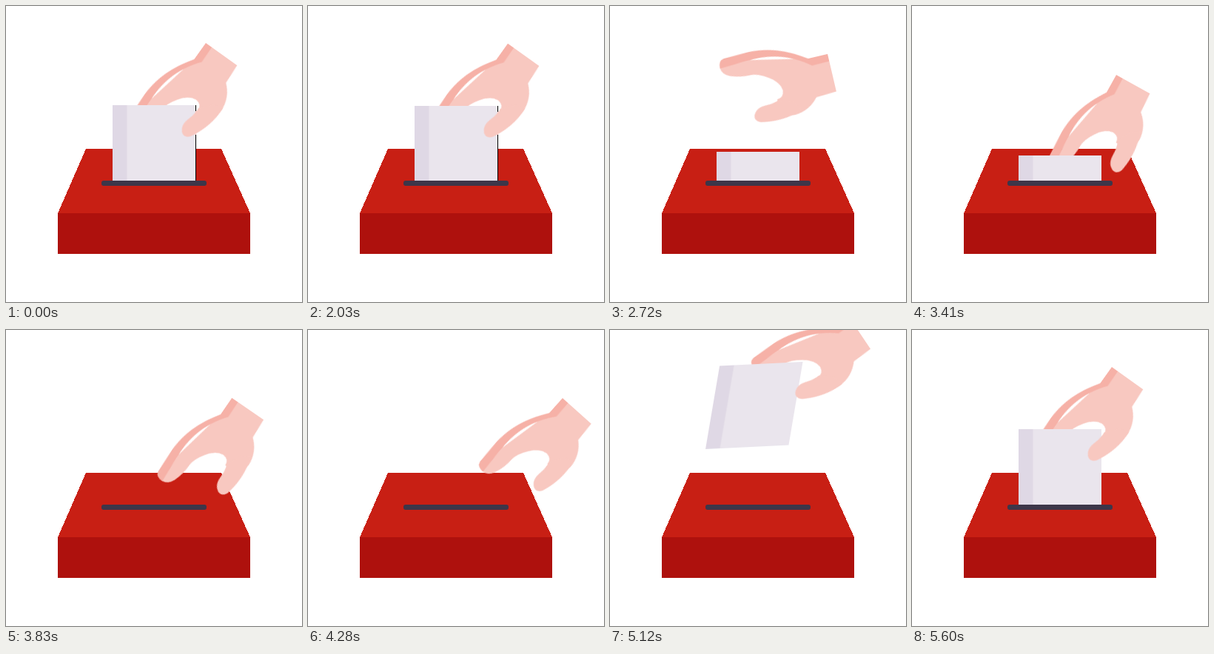
Animation, 400 px wide and 400 px high, one loop 5.63 s. Source, as an HTML page:

```html
<!DOCTYPE html>
<html lang="en">
<head>
<meta charset="utf-8">
<title>Casting a ballot</title>
<style>
  html, body { margin: 0; height: 100%; overflow: hidden; background: #fff; }
  svg { display: block; width: 100%; height: 100%; }
  .skin { fill: #f8c8c0; }
  .shade { fill: #f6b1a7; }
  .box { shape-rendering: crispEdges; }

  .hand, .thumb, .sheet { animation: 5630ms ease-in-out infinite; }
  .hand { animation-name: hand; }
  .thumb { animation-name: thumb; transform-origin: 57px 72px; }
  .sheet { animation-name: sheet; }

  /* push down, let go, push again, leave to the right, return from above */
  @keyframes hand {
    0%, 35.52% { transform: translate(270px, 50px) rotate(35.5deg); }
    42.63% { transform: translate(270px, 113px) rotate(35.5deg); }
    48.31% { transform: translate(294px, 65px) rotate(76.8deg); animation-timing-function: ease-out; }
    50.44% { transform: translate(294px, 58px) rotate(76.8deg); animation-timing-function: ease-in; }
    60.57% { transform: translate(276px, 93px) rotate(29deg); animation-timing-function: ease-out; }
    64.65% { transform: translate(278px, 113px) rotate(29deg); }
    70.69% { transform: translate(323px, 78px) rotate(38deg); }
    76.02% { transform: translate(344px, 92px) rotate(41.8deg); animation-timing-function: ease-in; }
    80.82% { transform: translate(534px, 172px) rotate(41.8deg); animation-timing-function: step-end; }
    83.48% { transform: translate(419px, -63px) rotate(95.5deg); animation-timing-function: linear; }
    88.81% { transform: translate(347px, -48px) rotate(65.5deg); animation-timing-function: ease-out; }
    99.47%, 100% { transform: translate(270px, 50px) rotate(35.5deg); }
  }
  @keyframes thumb {
    0%, 42.63%, 83.48%, 100% { transform: none; }
    48.31%, 64.65% { transform: translateY(-4px) rotate(-17deg); }
    76.02%, 80.82% { transform: translateY(-3px) rotate(-9deg); }
  }
  @keyframes sheet {
    0%, 35.52% { transform: translate(144px, 134px) skew(0deg, 0deg); }
    42.63%, 59.68% { transform: translate(144px, 197px) skew(0deg, 0deg); animation-timing-function: linear; }
    35.52% { animation-timing-function: ease-in-out; }
    60.57% { transform: translate(144px, 202px) skew(0deg, 0deg); animation-timing-function: linear; }
    65.72% { transform: translate(144px, 243px) skew(0deg, 0deg); animation-timing-function: step-end; }
    83.48% { transform: translate(178px, -100px) skew(0deg, -8deg); animation-timing-function: linear; }
    88.81% { transform: translate(150px, 10px) skew(-14deg, -4deg); animation-timing-function: ease-out; }
    99.47%, 100% { transform: translate(144px, 134px) skew(0deg, 0deg); }
  }
</style>
</head>
<body>
<svg viewBox="0 0 400 400">
  <clipPath id="aboveSlot"><rect width="400" height="240"/></clipPath>
  <g class="box">
    <path fill="#c81f14" d="M108 193H291L330 280H70Z"/>
    <rect x="70" y="280" width="260" height="55" rx="1" fill="#ae110d"/>
  </g>
  <g class="hand">
    <path class="skin" d="M0 0H52L53.5 28C63 36 70 48 70 62L66 84L44 80Q44 71 34 70
      Q22 71 13 85Q4 98 4 108Q4 122 -1 135Q-6 146 -15 146L-16 104L0 27Z"/>
    <path class="shade" d="M0 0H10L10.5 24C-9 48 -17 74 -16 104L-14 146
      Q-25 146 -26 138L-27 104C-26 70 -14 48 0 27Z"/>
  </g>
  <g clip-path="url(#aboveSlot)">
    <g class="sheet">
      <rect width="112" height="112" fill="#eae5ed"/>
      <rect width="19.5" height="112" fill="#dfd8e5"/>
    </g>
  </g>
  <rect x="129" y="236" width="142" height="7" rx="3" fill="#3d3649"/>
  <g class="hand">
    <path class="thumb skin" d="M70 58C72 84 62 105 57 114Q51 122 44 117
      Q37 110 40 99Q44 88 43 78L56 62Z"/>
  </g>
</svg>
</body>
</html>
```
